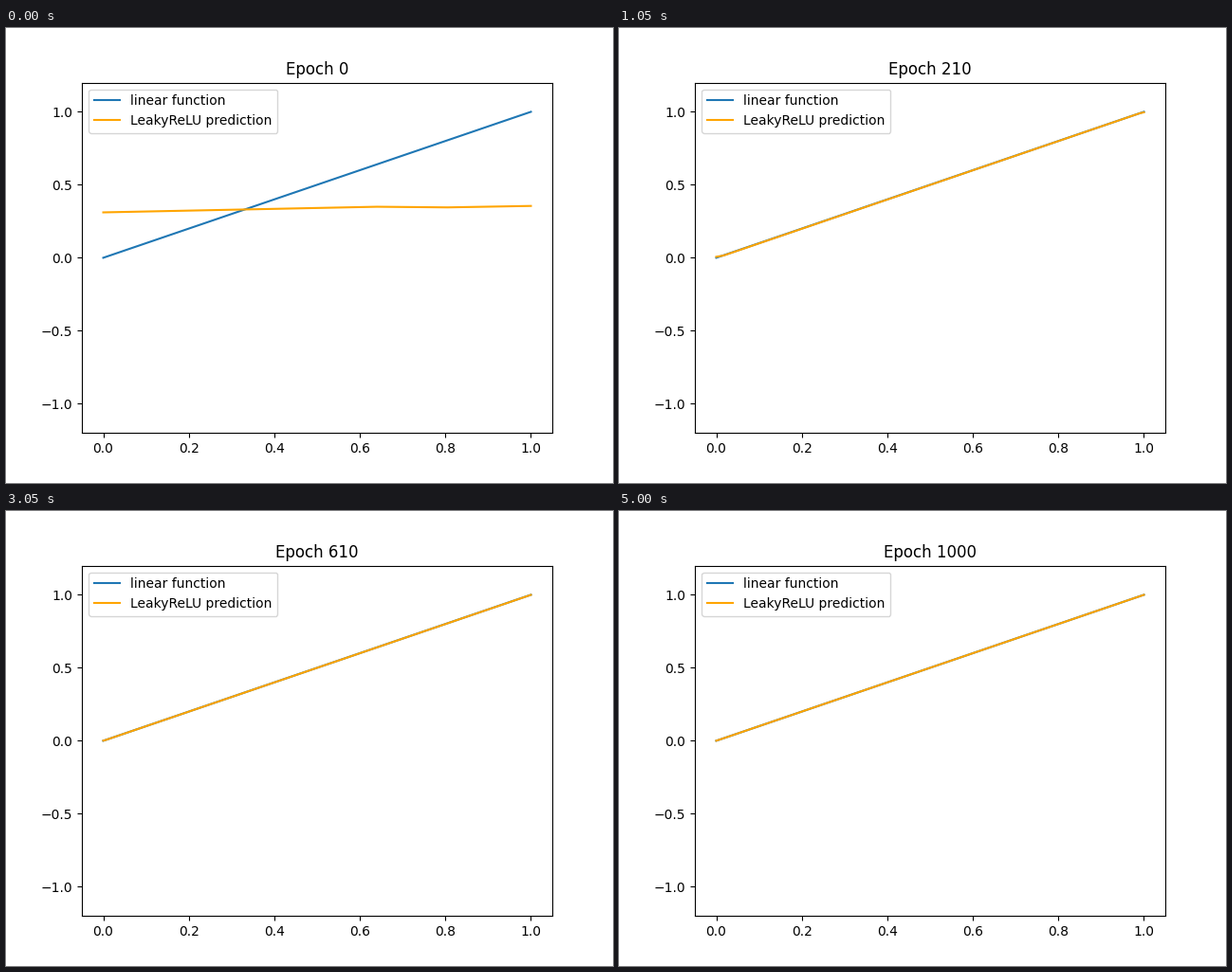
These frames come from a looping animation (640 px wide and 480 px high, 5050 ms). A matplotlib script:

```python
import numpy as np
import matplotlib.pyplot as plt
from matplotlib.animation import FuncAnimation

FRAMES = 101
STEP = 10     # epochs per frame
SETTLED = 7   # frame at which only the end bends remain

x = np.linspace(0, 1, 201)


def relu(v):
    return np.maximum(v, 0)


# Output of the untrained network
start = 0.311 + 0.061 * x - 0.09 * relu(x - 0.635) + 0.08 * relu(x - 0.8)


def predict(i):
    untrained = np.exp(-(i / 2.5) ** 1.8)
    decay = (SETTLED / max(i, SETTLED)) ** 1.7
    # Bends at both ends shrink towards the corners as the error decays
    low = 0.5 * relu(0.11 * decay - x)
    high = 0.34 * relu(x - 1 + 0.06 * decay)
    fit = x + low - high - 0.011 * decay * (1 - 0.8 * x)
    return untrained * start + (1 - untrained) * fit


fig, ax = plt.subplots(figsize=(6.4, 4.8), dpi=100)
ax.plot(x, x, label="linear function")
curve, = ax.plot(x, predict(0), color="orange", label="LeakyReLU prediction")
ax.set_xlim(-0.05, 1.05)
ax.set_ylim(-1.2, 1.2)
ax.legend(loc="upper left")
title = ax.set_title("Epoch 0")


def update(i):
    curve.set_ydata(predict(i))
    title.set_text(f"Epoch {i * STEP}")
    return curve, title


anim = FuncAnimation(fig, update, frames=FRAMES, interval=50,
                     repeat=True, repeat_delay=0, blit=False)
plt.show()
```
